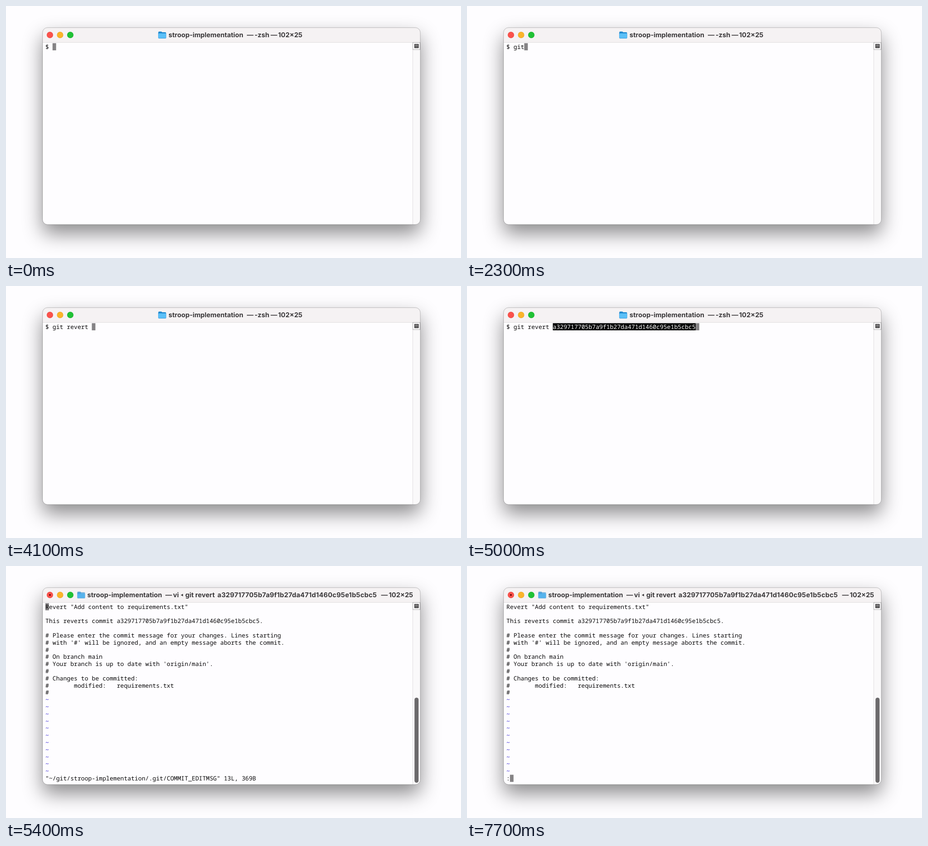
Recreate the animation shown at these times as an HTML page with a canvas. Size 1005 by 557 pixels, loop 8000 ms.

```html
<!DOCTYPE html>
<html lang="en">
<head>
<meta charset="utf-8">
<title>Terminal</title>
<style>
html, body { margin: 0; width: 100%; height: 100%; overflow: hidden; background: #fefdff; }
canvas { display: block; width: 1005px; height: 557px; }
</style>
</head>
<body>
<canvas id="stage" width="1005" height="557"></canvas>
<script>
const ctx = document.getElementById('stage').getContext('2d');
const LOOP = 8000;
const MONO = '500 13.15px "Noto Sans Mono", "DejaVu Sans Mono", monospace';
const BOLD = '700 14.67px Inter, Roboto, sans-serif';
const COL = 7.89, ROW = 15.8, LEFT = 87, TOP = 82.2;
const INK = '#0a090a', CURSOR = '#858385';
const HASH = 'a329717705b7a9f1b27da471d1460c95e1b5cbc5';
const PROMPT = '$ git revert ';

const PASTE = 4400, ENTER = 5300, EDITOR = 5400, COMMAND = 7700;
// [time, characters of the prompt line visible from then on]
const TYPING = [[0, 2], [1900, 3], [2200, 4], [2300, 5], [2800, 6], [3300, 8],
  [3500, 9], [3700, 10], [3800, 11], [3900, 12], [4100, 13]];

const MESSAGE = [
  'Revert "Add content to requirements.txt"',
  '',
  `This reverts commit ${HASH}.`,
  '',
  '# Please enter the commit message for your changes. Lines starting',
  "# with '#' will be ignored, and an empty message aborts the commit.",
  '#',
  '# On branch main',
  "# Your branch is up to date with 'origin/main'.",
  '#',
  '# Changes to be committed:',
  '#       modified:   requirements.txt',
  '#'
];
const STATUS = '"~/git/stroop-implementation/.git/COMMIT_EDITMSG" 13L, 369B';

const SHELL_TITLE = [[359, 'stroop-implementation'], [532, '—'], [549, '-zsh'],
  [584.5, '—'], [601, '102×25']];
const EDITOR_TITLE = [[179.5, 'stroop-implementation'], [352, '—'], [369, 'vi'],
  [396, 'git revert'], [467, HASH, '0.2px'], [828.5, '—'], [845.5, '102×25']];

function rect(x, y, w, h, color) {
  ctx.fillStyle = color;
  ctx.fillRect(x, y, w, h);
}

function round(x, y, w, h, r, color) {
  ctx.fillStyle = color;
  ctx.beginPath();
  ctx.roundRect(x, y, w, h, r);
  ctx.fill();
}

function disc(x, y, r, color) {
  ctx.fillStyle = color;
  ctx.beginPath();
  ctx.arc(x, y, r, 0, Math.PI * 2);
  ctx.fill();
}

function cells(row, col, count, color) {
  rect(LEFT + col * COL, TOP + row * ROW, count * COL, ROW, color);
}

function write(row, col, text, color = INK) {
  ctx.font = MONO;
  ctx.fillStyle = color;
  ctx.fillText(text, LEFT + col * COL, TOP + 12.5 + row * ROW);
}

function folder(x, alpha) {
  ctx.globalAlpha = alpha;
  round(x + 0.5, 56.5, 8, 6, 1.5, '#1d86cd');
  round(x + 0.5, 58, 17, 13, 1.5, '#1d86cd');
  round(x + 0.5, 60.5, 17, 11.2, 1.5, '#2b95dc');
  round(x + 0.5, 60.5, 17, 10.3, 1.5, '#5cc0f7');
  ctx.globalAlpha = 1;
}

function title(parts) {
  ctx.font = BOLD;
  ctx.fillStyle = '#3b393b';
  for (const [x, text, spacing = '0px'] of parts) {
    ctx.letterSpacing = spacing;
    ctx.fillText(text, x, 69);
  }
  ctx.letterSpacing = '0px';
}

function splitButton() {
  rect(898, 80, 17, 17, '#b3b1b3');
  rect(899, 81, 15, 15, '#f8f7f8');
  rect(902, 84, 9.5, 9, '#3a383a');
  rect(903.2, 86, 7, 1.2, '#f1f0f1');
  rect(903.2, 89.6, 7, 1.2, '#c4c2c4');
}

function windowFrame() {
  rect(0, 0, 1005, 557, '#fefdff');
  ctx.save();
  ctx.shadowColor = 'rgba(0,0,0,0.45)';
  ctx.shadowBlur = 44;
  ctx.shadowOffsetY = 20;
  round(81, 48, 834, 435, 11, '#fefdff');
  ctx.restore();

  round(81, 48, 834, 32, [11, 11, 0, 0], '#f5f2f3');
  rect(81, 80, 834, 1, '#dedbdd');
  round(898, 81, 17, 402, [0, 0, 11, 0], '#faf9fa');
  rect(898, 81, 1, 402, '#dfdddf');
  splitButton();

  ctx.strokeStyle = 'rgba(0,0,0,0.24)';
  ctx.lineWidth = 1;
  ctx.beginPath();
  ctx.roundRect(80.7, 47.8, 834.4, 435.2, 11);
  ctx.stroke();

  [['#e2463f', '#fa524c'], ['#e0a021', '#fab42a'], ['#17a82b', '#20c235']]
    .forEach(([edge, fill], i) => {
      disc(97 + i * 22.5, 64, 7, edge);
      disc(97 + i * 22.5, 64, 6.4, fill);
    });
}

function shell(t) {
  folder(336, 1);
  title(SHELL_TITLE);
  if (t < PASTE) {
    const typed = TYPING.filter(([at]) => at <= t).pop()[1];
    write(0, 0, PROMPT.slice(0, typed));
    cells(0, typed, 1, CURSOR);
    return;
  }
  const start = PROMPT.length, end = start + HASH.length;
  write(0, 0, PROMPT);
  if (t < ENTER) {
    cells(0, start, HASH.length, '#000');
    write(0, start, HASH, '#fff');
    cells(0, end, 1, CURSOR);
  } else {
    const hint = 'hint: Waiting for your editor to close the file... ';
    write(0, start, HASH);
    write(0, -0.9, '[', '#a5a3a5');
    write(0, 101.8, ']', '#a5a3a5');
    write(1, 0, hint);
    cells(1, hint.length, 1, CURSOR);
  }
}

function editor(t) {
  const command = t >= COMMAND;
  disc(97, 64, 2.1, '#6d0806');
  folder(157, 0.55);
  title(EDITOR_TITLE);
  ctx.beginPath();
  ctx.moveTo(386, 64.3);
  ctx.lineTo(391, 61.6);
  ctx.lineTo(391, 67);
  ctx.fill();

  if (!command) cells(0, 0, 1, CURSOR);
  MESSAGE.forEach((line, row) => write(row, 0, line));
  for (let row = MESSAGE.length; row < 24; row++) write(row, 0, '~', '#3a2bd6');
  write(24, 0, command ? ':' : STATUS);
  if (command) cells(24, 1, 1, CURSOR);
  round(902.3, 291, 9, 188, 4.5, '#6c6a6c');
}

function draw() {
  const t = performance.now() % LOOP;
  windowFrame();
  if (t < EDITOR) shell(t);
  else editor(t);
  requestAnimationFrame(draw);
}

ctx.textRendering = 'geometricPrecision';
draw();
</script>
</body>
</html>
```
